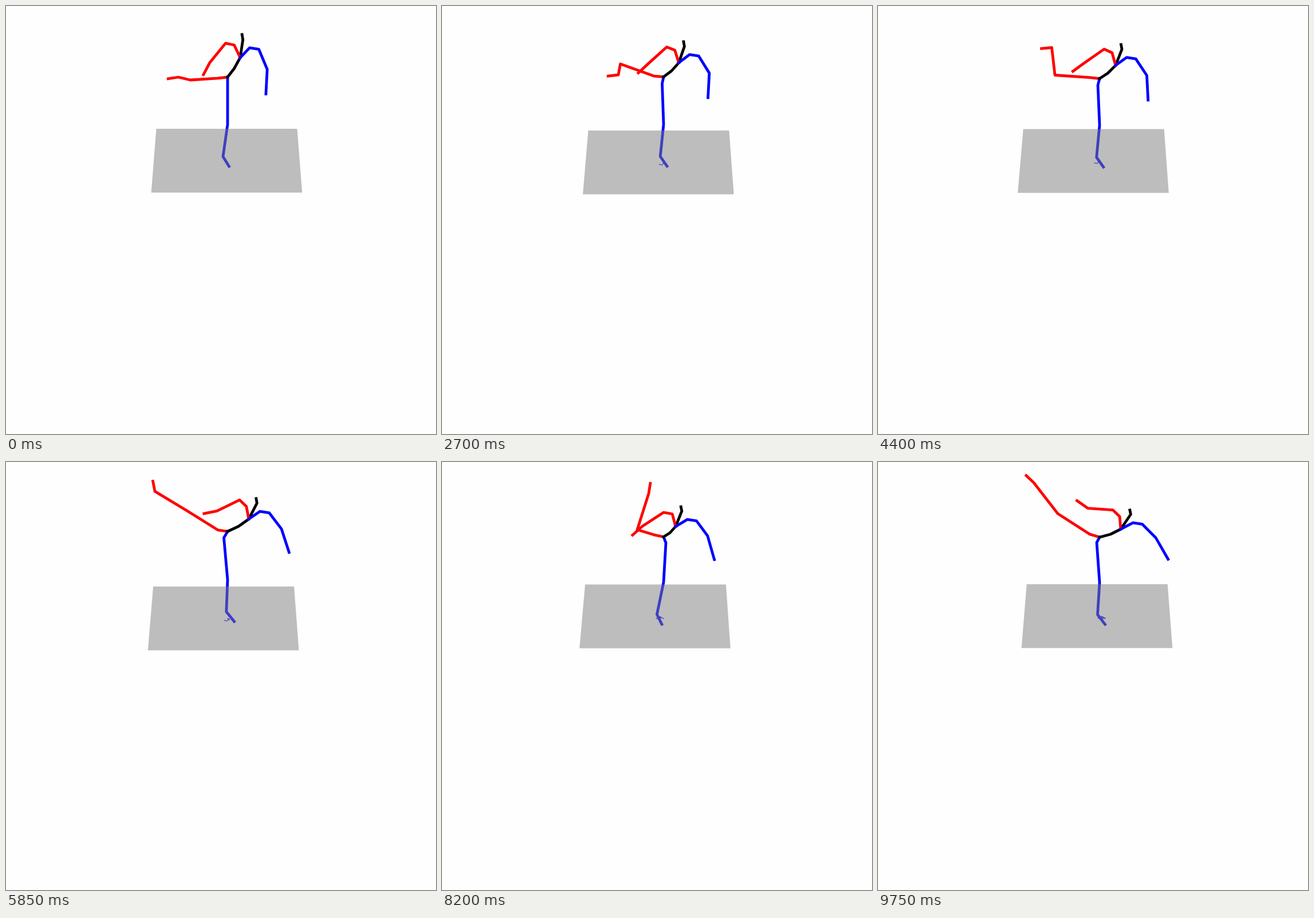
Write an HTML page with a canvas that moves like this. It is 751x746 px and loops after 9800 ms.

```html
<!DOCTYPE html>
<html lang="en">
<head>
<meta charset="utf-8">
<title>Stick figure</title>
<style>
html, body { margin: 0; width: 100%; height: 100%; overflow: hidden; background: #fefefe; }
canvas { display: block; }
</style>
</head>
<body>
<canvas id="stage" width="751" height="746"></canvas>
<script>
const LOOP = 9800, STEP = 50, CENTER = 387;
const RED = '#f00', BLUE = '#00f', BLACK = '#000';
const ctx = document.getElementById('stage').getContext('2d');

// Seven key poses; every other joint follows from these controls.
// Angles are in degrees from straight down, positive to the right.
const times = [0, 1500, 2700, 4400, 5850, 8200, 9750];
const controls = {
  floorX: [254, 249, 246.4, 244.5, 248.2, 240.5, 251],
  floorY: [325, 324, 328, 325.5, 328, 324.5, 324],
  hipY: [124, 120, 123.5, 126.5, 121, 130.5, 131],
  neckX: [22, 20, 26.5, 28, 37, 21, 37],
  neckY: [-34, -47, -24.5, -23, -21.5, -18, -14],
  sway: [0, -0.5, -2.5, -3, -6.5, 4, -5],
  redUpper: [-39, -38, -48, -55, -64, -57, -94],
  redFore: [-28, 33, -47, -54, -79, -48, -125],
  blueFore: [-3, -8, -3, 3, 18, 16, 30],
  kneeX: [-65, -6, -75.5, -78, -70, -46, -73],
  kneeY: [5, -20, -22.5, -6, -35.5, -12.5, -41],
  shinX: [-21, -52, -3.5, -5.5, -57, 20, -42],
  shinY: [-5, 0, 19, -48, -33.5, -63, -54],
  toe: [-81, -133, -83, -85, -169, -189, -133]
};
// Raised and dropped foot between the poses: time, height.
const kicks = [[5350, 50], [6500, -50], [8900, 30]];

// Slope at key k that never overshoots its neighbours.
function slope(values, k) {
  if (k === 0 || k === times.length - 1) return 0;
  const before = (values[k] - values[k - 1]) / (times[k] - times[k - 1]);
  const after = (values[k + 1] - values[k]) / (times[k + 1] - times[k]);
  return before * after > 0 ? 2 * before * after / (before + after) : 0;
}

function sample(values, t) {
  let k = 0;
  while (k < times.length - 2 && t >= times[k + 1]) k++;
  const span = times[k + 1] - times[k];
  const u = (t - times[k]) / span, v = 1 - u;
  return values[k] * v * v * (1 + 2 * u) + values[k + 1] * u * u * (3 - 2 * u) +
    span * u * v * (slope(values, k) * v - slope(values, k + 1) * u);
}

const add = ([x, y], dx, dy) => [x + dx, y + dy];

function swing(from, angle, length) {
  const a = angle * Math.PI / 180;
  return add(from, length * Math.sin(a), length * Math.cos(a));
}

// Joint chains with their colours, in drawing order.
function figure(t) {
  const c = {};
  for (const name in controls) c[name] = sample(controls[name], t);
  const { neckX: nx, neckY: ny, sway } = c;
  const hip = [CENTER, c.hipY];
  const neck = add(hip, nx, ny);

  const lift = kicks.reduce((sum, [at, h]) => sum + h * Math.exp(-(((t - at) / 250) ** 2)), 0);
  const redKnee = add(hip, c.kneeX, c.kneeY);
  const redAnkle = add(redKnee, c.shinX, c.shinY - lift);
  const redLeg = [hip, add(hip, -17, -10 - 0.35 * ny), redKnee, redAnkle, swing(redAnkle, c.toe, 18)];

  const bob = (c.hipY - 124) / 2;
  const blueAnkle = [CENTER - 8 - 0.9 * sway, 262.5 + bob];
  const blueLeg = [hip, add(hip, sway, 6 - 0.24 * ny), [CENTER, 206.5 + bob],
    blueAnkle, add(blueAnkle, 10.5 - 0.5 * sway, 17)];

  const skull = add(neck, 0.31 * nx + 0.4 * ny + 11.5, 0.27 * ny - 22);
  const spine = [hip, add(hip, nx / 2 + 0.5, ny / 2 + 2), neck, skull,
    add(skull, -1.5, 0.09 * ny - 6)];

  const redCollar = add(neck, 0.17 * nx + 0.3 * ny - 4, -22);
  const redShoulder = add(redCollar, 0.22 * nx - 20, 9 - 0.55 * nx);
  const redElbow = swing(redShoulder, c.redUpper, 44);
  const redArm = [neck, redCollar, redShoulder, redElbow, swing(redElbow, c.redFore, 23)];

  const blueCollar = add(neck, 25 + 0.25 * ny, 0.3 * ny - 7);
  const blueShoulder = add(blueCollar, 16, 2.5);
  const blueElbow = add(blueShoulder, 0.2 * nx + 0.3 * ny + 20.5, 16 - 0.56 * ny);
  const reach = 43 - Math.max(0, -ny - 34);
  const blueArm = [neck, blueCollar, blueShoulder, blueElbow, swing(blueElbow, c.blueFore, reach)];

  return [[redLeg, RED], [blueLeg, BLUE], [spine, BLACK], [redArm, RED], [blueArm, BLUE]];
}

function trace(points) {
  ctx.beginPath();
  for (const [x, y] of points) ctx.lineTo(x, y);
}

function line(points, color, width = 4.8) {
  trace(points);
  ctx.strokeStyle = color;
  ctx.lineWidth = width;
  ctx.stroke();
}

const floorPath = Array.from({ length: LOOP / STEP }, (_, i) =>
  [sample(controls.floorX, i * STEP), sample(controls.floorY, i * STEP)]);

function draw(t) {
  const i = Math.floor(t / STEP);
  ctx.fillStyle = '#fefefe';
  ctx.fillRect(0, 0, 751, 746);
  ctx.lineJoin = 'round';
  ctx.lineCap = 'square';

  // Ground track of the hip, carried along by the floor.
  const [x, y] = floorPath[i];
  const track = floorPath.slice(0, i + 1)
    .map(([px, py]) => [CENTER + (x - px) * 0.97, 273 + y - py]);
  if (i > 0) line(track, BLUE, 1.2);

  for (const [points, color] of figure(i * STEP)) line(points, color);

  const far = 262.5 + (x - 254) * 0.93, front = y + 0.3, back = front - 111.2;
  trace([[x - 0.4, front], [far, back], [far + 246, back], [x + 263.3, front]]);
  ctx.fillStyle = 'rgba(127, 127, 127, 0.505)';
  ctx.fill();
}

const start = performance.now();
function tick(now) {
  draw(Math.max(0, now - start) % LOOP);
  requestAnimationFrame(tick);
}
draw(0);
requestAnimationFrame(tick);
</script>
</body>
</html>
```
